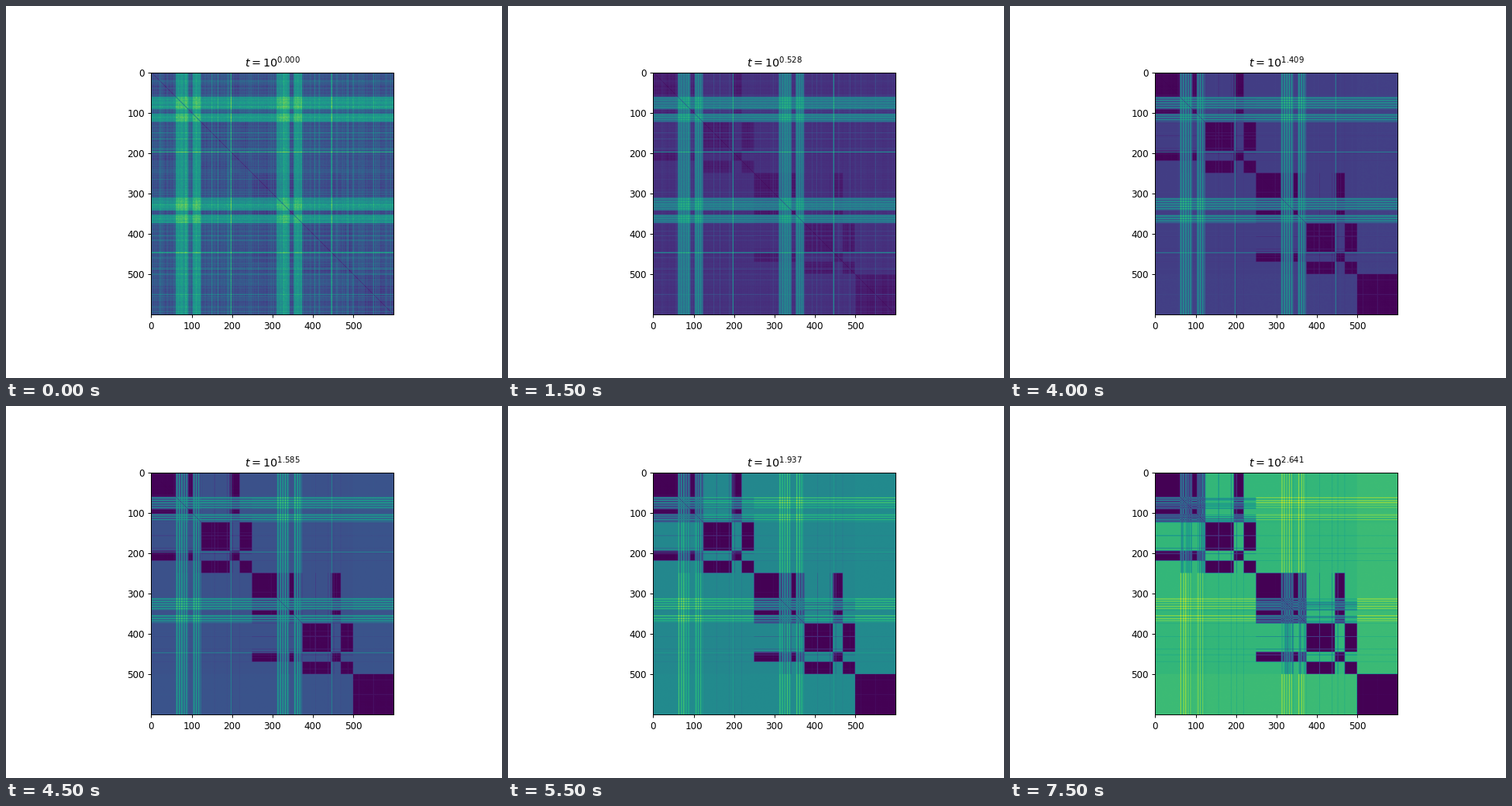
Write a matplotlib script that moves like this. It is 640x480 px and loops after 8000 ms.

```python
import numpy as np
import matplotlib.pyplot as plt
from matplotlib.animation import FuncAnimation

N, FRAMES, INTERVAL = 600, 16, 500
DPI = 86.4
rng = np.random.default_rng(4)
idx = np.arange(N)

# Membership columns: (half, half, bridge) for each pair, then a lone cluster
LONE = 6
BANDS = [(61, 93), (103, 124)]
HALVES = [(0, 125, 0), (125, 195, 1), (195, 219, 0), (219, 250, 1)]
BETWEEN_HALVES = [124, 157, 188, 202, 219]

member = np.zeros((N, 7))
member[500:, LONE] = 1
loose = np.zeros(N, bool)
bridge = np.zeros(N, bool)


def build_pair(start, col):
    for lo, hi, half in HALVES:
        member[start + lo:start + hi, col + half] = 1
    for lo, hi in BANDS:
        band = np.arange(start + lo, start + hi)
        loose[band] = True
        bridge[band[(band - band[0] - 2) % 6 < 3]] = True
        member[band[rng.random(len(band)) < .4], col:col + 2] = .5
    member[[start + i for i in BETWEEN_HALVES], col:col + 2] = .5


build_pair(0, 0)
build_pair(250, 3)
loose &= ~bridge

spread = rng.lognormal(0, .75, N)
strength = rng.uniform(.65, 1.2, N)
late = rng.uniform(.25, 1.1, N)
extra = np.zeros(N)
extra[rng.choice(N, 14, replace=False)] = 1
extra[[86, 335, 550]] = 2
hubs = np.array([198, 447])

noise = rng.normal(0, 1, (N, N))
noise = (noise + noise.T) / 2
apart = 1 - np.eye(N)


def distances(k):
    merge = 1 / (1 + np.exp(-(k - 10.4) / 1.2))

    # Each point's own distance from its cluster, fading as t grows
    size = .023 * np.exp(-.75 * k) * spread
    size += .13 * np.exp(-.4 * k) * extra
    size[loose] += .2 * np.exp(-.21 * k) * strength[loose]
    size[bridge] += .2 * (1 - merge) * strength[bridge]
    size[hubs] += .45 * np.exp(-.06 * k) * (1 - merge)
    size[hubs - 1] += .36 * np.exp(-.22 * k)

    # Bridge points gather into clusters of their own, near both halves
    m = member.copy()
    for col, first in [(0, 0), (3, 250)]:
        rows = idx[bridge & (idx // 250 * 250 == first)]
        pull = merge * late[rows]
        m[rows, col] = 1 - merge + 1.05 * merge
        m[rows, col + 1] = .74 * pull
        m[rows, col + 2] = late[rows]

    between = .115 + .56 * merge
    scale = np.full(7, between ** 2 / 2)
    scale[[2, 5]] = merge * (.1 + .6 * (1 - merge))
    scale[LONE] *= 1.12

    x = m * np.sqrt(scale)
    sq = (x ** 2).sum(1)
    d2 = sq[:, None] + sq - 2 * x @ x.T
    d2 += (size[:, None] + size) * apart
    return np.sqrt(np.clip(d2, 0, None)) * (1 + .08 * np.exp(-.2 * k) * noise)


fig = plt.figure(figsize=(640 / DPI, 480 / DPI), dpi=DPI)
ax = fig.add_axes([187.2 / 640, 81.7 / 480, 312.6 / 640, 312.6 / 480])
image = ax.imshow(distances(0), cmap="viridis", vmin=0, vmax=1)
ax.set_xticks(range(0, N, 100))
ax.set_yticks(range(0, N, 100))
title = ax.set_title("")


def update(k):
    image.set_data(distances(k))
    title.set_text(f"$t = 10^{{{k * np.log10(1.5):.3f}}}$")
    return image, title


anim = FuncAnimation(fig, update, frames=FRAMES, interval=INTERVAL,
                     repeat=True, repeat_delay=0, blit=False)
plt.show()
```
